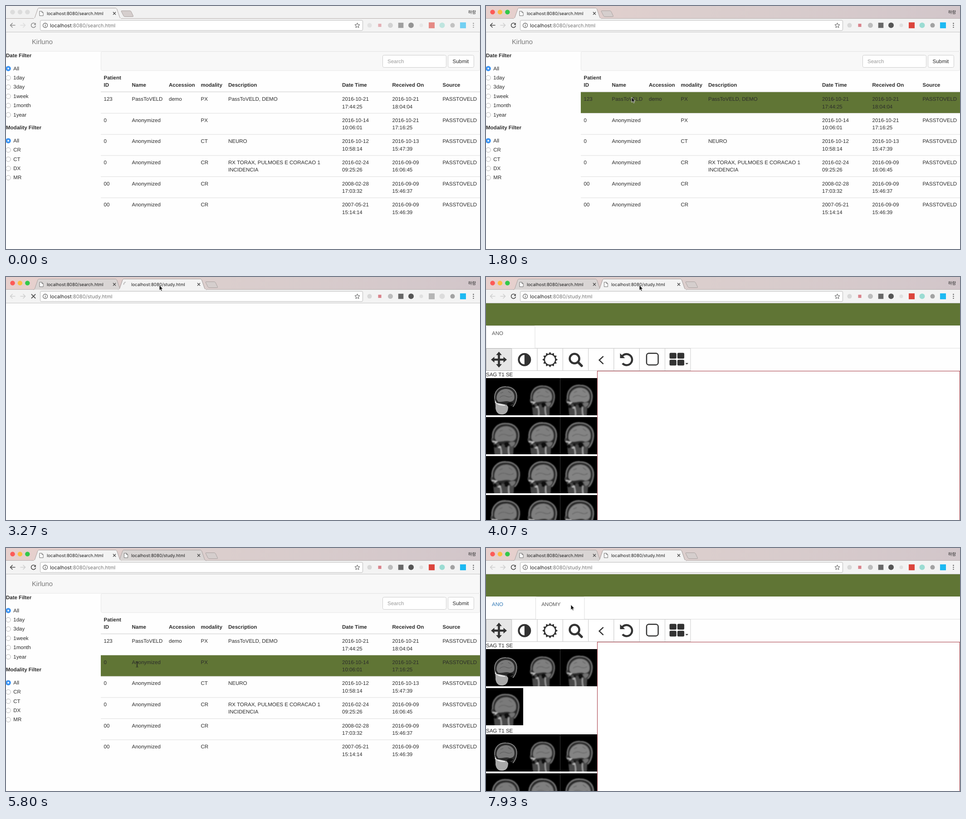
Recreate the animation shown at these times as an HTML page. Size 1045x536 px, loop 8000 ms.

```html
<!DOCTYPE html>
<html lang="en">
<head>
<meta charset="utf-8">
<title>Study browser</title>
<style>
html, body { margin: 0; width: 100%; height: 100%; overflow: hidden; background: #fff; }
svg { display: block; }
#stage { width: 100vw; height: 100vh; }
text { font: 11.5px "Liberation Sans", Arial, sans-serif; fill: #2b2b2b; white-space: pre; text-rendering: geometricPrecision; }
.b { font-weight: bold; }
.brand { font-size: 14.76px; }
.tabText { font: 9.65px Inter, sans-serif; fill: #1c1c1c; }
.url { font: 11.15px Inter, sans-serif; fill: #222; }
.url tspan { fill: #777; }
.user { font: 500 9.4px "Noto Sans CJK KR", "Noto Sans CJK", sans-serif; fill: #222; }
.line { fill: none; stroke: #4c4c4c; stroke-width: 1.6; }

.step { animation: 8s step-end infinite; }
.idle { animation-name: idle; }
.nav { animation-name: nav; }
.search { animation-name: search; }
.study { animation-name: study; }
.oneTab { animation-name: oneTab; }
.twoTabs { animation-name: twoTabs; }
.loading { animation-name: loading; }
.loaded { animation-name: loaded; }
.first { animation-name: first; }
.second { animation-name: second; }
.row0 { animation-name: row0; }
.row1 { animation-name: row1; }
.arrow { animation-name: arrow; }
.beam { animation-name: beam; }
.ring { animation-name: ring; }
.spin { animation: spin 1s linear infinite; }
.cursor { animation: move 8s ease-in-out infinite; }

@keyframes idle { 0% { opacity: 1 } 15.875%, 100% { opacity: 0 } }
@keyframes nav { 0% { opacity: .6 } 15.875%, 100% { opacity: 1 } }
@keyframes search { 0% { opacity: 1 } 29.125% { opacity: 0 } 67.5% { opacity: 1 } 78.375%, 100% { opacity: 0 } }
@keyframes study { 0% { opacity: 0 } 29.125% { opacity: 1 } 67.5% { opacity: 0 } 78.375%, 100% { opacity: 1 } }
@keyframes oneTab { 0% { opacity: 1 } 29.125%, 100% { opacity: 0 } }
@keyframes twoTabs { 0% { opacity: 0 } 29.125%, 100% { opacity: 1 } }
@keyframes loading { 0% { opacity: 0 } 29.125% { opacity: 1 } 47.5% { opacity: 0 } 78.375% { opacity: 1 } 81.75%, 100% { opacity: 0 } }
@keyframes loaded { 0% { opacity: 1 } 29.125% { opacity: 0 } 47.5% { opacity: 1 } 78.375% { opacity: 0 } 81.75%, 100% { opacity: 1 } }
@keyframes first { 0% { opacity: 0 } 47.5% { opacity: 1 } 67.5%, 100% { opacity: 0 } }
@keyframes second { 0% { opacity: 0 } 85%, 100% { opacity: 1 } }
@keyframes row0 { 0% { opacity: 0 } 15.875% { opacity: 1 } 29.125% { opacity: 0 } 70.06% { opacity: 1 } 70.78%, 100% { opacity: 0 } }
@keyframes row1 { 0% { opacity: 0 } 70.78% { opacity: 1 } 78.375%, 100% { opacity: 0 } }
@keyframes arrow { 0% { opacity: 1 } 70.78% { opacity: 0 } 78.375%, 100% { opacity: 1 } }
@keyframes beam { 0% { opacity: 0 } 70.78% { opacity: 1 } 78.375%, 100% { opacity: 0 } }
@keyframes ring {
  0% { opacity: 0 } 15.4% { opacity: 1 } 17.6% { opacity: 0 }
  26.8% { opacity: 1 } 29.1% { opacity: 0 }
  65.8% { opacity: 1 } 67.5% { opacity: 0 }
  75.8% { opacity: 1 } 77.8%, 100% { opacity: 0 }
}
@keyframes spin { to { transform: rotate(-360deg) } }
@keyframes move {
  0%, 1% { transform: translate(1000px, 552px) }
  6.5% { transform: translate(915px, 372px) }
  14%, 33% { transform: translate(321px, 201px) }
  40%, 57% { transform: translate(338px, 18px) }
  64.5%, 67.5% { transform: translate(184px, 20px) }
  71.5%, 77.5% { transform: translate(289px, 257px) }
  79%, 88% { transform: translate(291px, 256px) }
  97.5%, 100% { transform: translate(187px, 125px) }
}
</style>
</head>
<body>
<svg id="stage" viewBox="0 0 1045 536" xmlns="http://www.w3.org/2000/svg"></svg>
<script>
const GREEN = '#607535';
const text = (x, y, s, cls = '', fill = '') =>
  `<text x="${x}" y="${y}" class="${cls}"${fill && ` style="fill:${fill}"`}>${s}</text>`;
const rect = (x, y, w, h, fill, more = '') =>
  `<rect x="${x}" y="${y}" width="${w}" height="${h}" fill="${fill}" ${more}/>`;
const disc = (x, y, r, fill, more = '') =>
  `<circle cx="${x}" cy="${y}" r="${r}" fill="${fill}" ${more}/>`;
const path = (d, fill, more = '') => `<path d="${d}" fill="${fill}" ${more}/>`;
const line = (d, more = '') => `<path class="line" d="${d}" ${more}/>`;
const step = (name, body) => `<g class="step ${name}">${body}</g>`;
const at = (x, y, body) => `<g transform="translate(${x} ${y})">${body}</g>`;

// Outline of a star with n spikes around (x, y)
const starPath = (x, y, n, outer, inner) => 'M' + Array.from({ length: 2 * n }, (_, i) => {
  const a = i * Math.PI / n, r = i % 2 ? inner : outer;
  return (x + r * Math.sin(a)).toFixed(2) + ' ' + (y - r * Math.cos(a)).toFixed(2);
}).join('L') + 'Z';

/* Search page */
const cols = [215.5, 277.5, 359, 429.5, 490, 741, 851.5, 962.5];
const heads = ['ID', 'Name', 'Accession', 'modality', 'Description', 'Date Time', 'Received On', 'Source'];
const rows = [
  ['123', 'PassToVELD', 'demo', 'PX', 'PassToVELD, DEMO', '2016-10-21|17:44:25', '2016-10-21|18:04:04'],
  ['0', 'Anonymized', '', 'PX', '', '2016-10-14|10:06:01', '2016-10-21|17:16:25'],
  ['0', 'Anonymized', '', 'CT', 'NEURO', '2016-10-12|10:58:14', '2016-10-13|15:47:39'],
  ['0', 'Anonymized', '', 'CR', 'RX TORAX, PULMOES E CORACAO 1|INCIDENCIA', '2016-02-24|09:25:26', '2016-09-09|16:06:45'],
  ['00', 'Anonymized', '', 'CR', '', '2008-02-28|17:03:32', '2016-09-09|15:46:37'],
  ['00', 'Anonymized', '', 'CR', '', '2007-05-21|15:14:14', '2016-09-09|15:46:39']
];

function filter(title, y, items) {
  return text(0, y, title, 'b') + items.map((s, i) => {
    const cy = y + 25.2 + i * 20.4;
    const dot = i ? disc(5, cy, 5.2, '#fff', 'stroke="#b4b4b4"')
                  : disc(5, cy, 5.8, '#3b93f3') + disc(5, cy, 1.9, '#fff');
    return dot + text(16.3, cy + 3.5, s);
  }).join('');
}

function tableRow(cells, i) {
  const y = 190 + i * 46.6;
  const hover = i < 2 ? step('row' + i, rect(209, y, 836, 46.4, GREEN)) : '';
  const border = i ? rect(209, y - .5, 836, 1, '#ddd') : '';
  return border + hover + [...cells, 'PASSTOVELD'].map((cell, c) =>
    cell.split('|').map((s, k) => s && text(cols[c], y + 19.2 + k * 16.4, s)).join('')).join('');
}

const searchPage =
  rect(.5, 57.5, 1044, 42.5, '#f8f8f8', 'stroke="#e7e7e7" rx="3"') +
  text(57, 84, 'Kirluno', 'brand', '#777') +
  filter('Date Filter', 112.8, ['All', '1day', '3day', '1week', '1month', '1year']) +
  filter('Modality Filter', 272, ['All', 'CR', 'CT', 'DX', 'MR']) +
  rect(209.5, 100.5, 835, 42, '#f8f8f8', 'stroke="#e7e7e7" rx="3"') +
  rect(830.5, 108.5, 140, 27, '#fff', 'stroke="#ccc" rx="3"') + text(841, 126, 'Search', '', '#999') +
  rect(974.5, 108.5, 57, 27, '#fff', 'stroke="#ccc" rx="3"') + text(984.5, 126, 'Submit') +
  text(215.5, 161.8, 'Patient', 'b') + heads.map((s, i) => text(cols[i], 178.2, s, 'b')).join('') +
  rect(209, 188.6, 836, 1.6, '#ddd') + rows.map(tableRow).join('');

/* Study page */
function thumb(i, x, y) {
  const k = Math.min(1.06, .85 + i * .055);
  const gray = v => `rgb(${v},${v},${v})`;
  const neck = i
    ? path('M15 42Q10 49 13 53L17 58Q18 68 20 90H61Q58 70 64 58L62 40Z', gray(74)) +
      path('M30 62Q36 72 33 90M50 64Q48 76 53 90', 'none', 'stroke="#a0a0a0" stroke-width="3"')
    : path('M14 46Q18 60 17 70Q20 88 36 86Q50 84 50 66L40 54Z', '#a8a8a8') +
      path('M17 52Q26 62 42 60', 'none', 'stroke="#e2e2e2" stroke-width="6"');
  const skull =
    path('M15 46C13 26 26 13 44 14C62 14 73 26 72 42C71 54 66 62 60 64L20 56Z', '#2c2c2c') +
    path('M15 46C13 26 26 13 44 14C62 14 73 26 72 42C71 54 66 62 62 66', 'none', 'stroke="#808080" stroke-width="2.4"');
  const brain =
    path('M20 47C18 31 30 20 44 20C58 20 67 30 66 42C66 50 60 53 54 53C44 49 34 55 24 53Z', gray(122 + 5 * (i % 3))) +
    path('M28 42Q36 35 45 39T60 38M30 31L37 28M50 26L57 31', 'none', 'stroke="#5c5c5c" stroke-width="1.3"');
  const base = i
    ? path('M50 56Q58 52 64 55Q63 64 55 64Z', '#727272') +
      path('M40 58Q46 50 51 60L47 66H42Z', '#0c0c0c') +
      disc(21, 63, 4, '#0c0c0c') + disc(32, 60, 3, '#141414') +
      path('M14 53L24 54L20 57M27 66L33 66', 'none', 'stroke="#c4c4c4" stroke-width="2.4"')
    : path('M46 58Q56 52 64 57L52 65Z', '#0c0c0c');
  return `<svg x="${x}" y="${y}" width="82" height="82" viewBox="0 0 82 82">` + rect(0, 0, 82, 82, '#000') +
    `<g filter="url(#soft)" transform="translate(43 44.5) scale(${k}) translate(-43 -44)">${neck}${skull}${brain}${base}</g></svg>`;
}
const series = (y, n) => text(0, y - 4, 'SAG T1 SE') + Array.from({ length: n }, (_, i) =>
  thumb(i, i % 3 * 81.6, y + Math.floor(i / 3) * 86)).join('');

const arm = path('M-2.3 0V-10H-6.4L0 -17.5L6.4 -10H2.3V0Z', '#333');
const tools = [
  [0, 90, 180, 270].map(a => `<g transform="rotate(${a})">${arm}</g>`).join(''),
  disc(0, 0, 12.5, 'none', 'stroke="#333" stroke-width="4"') + path('M0 -12V12A12 12 0 0 0 0 -12Z', '#333'),
  path(starPath(0, 0, 12, 17, 13), '#333') + disc(0, 0, 11, '#fff'),
  disc(-2.3, -2.3, 10.5, 'none', 'stroke="#333" stroke-width="4.6"') +
    path('M5.5 5.5L13.5 13.5', 'none', 'stroke="#333" stroke-width="5.4" stroke-linecap="round"'),
  path('M5 -7.5L-4 1L5 9.5', 'none', 'stroke="#333" stroke-width="2.5"'),
  path('M-10.5 -6.5A12.2 12.2 0 1 1 -9 8.3', 'none', 'stroke="#333" stroke-width="4.4"') +
    path('M-14.5 -14V-3.2H-3.6Z', '#333'),
  rect(-12.3, -14, 25.6, 25.6, 'none', 'rx="5" stroke="#333" stroke-width="2.5"'),
  [0, 1, 2, 3].map(i => rect(-18 + i % 2 * 17.3, -15 + (i >> 1) * 15.2, 15.2, 12.8, '#333', 'rx="2.5"')).join('') +
    path('M17 7.5H23.4L20.2 10.8Z', '#333')
];

function studyPage(active, list) {
  const left = active ? 109.5 : .5;
  return rect(0, 57.5, 1045, 49.5, GREEN) +
    rect(0, 156.6, 1045, 1, '#ddd') +
    path(`M${left} 158V110Q${left} 107.5 ${left + 3} 107.5H${left + 104.5}Q${left + 107.5} 107.5 ${left + 107.5} 110V158`, '#fff', 'stroke="#ddd"') +
    text(13, 128.3, 'ANO', '', active ? '#337ab7' : '#555') +
    (active ? text(122.2, 128.3, 'ANOMY', '', '#555') : '') +
    tools.map((icon, i) =>
      rect(i * 56.3 + .5, 157.5, 56.3, 49, i ? '#fff' : '#e6e6e6', `stroke="${i ? '#ccc' : '#adadad'}"`) +
      at(28.5 + i * 56.3, 182.3, icon)).join('') +
    list + rect(245.5, 207.5, 799, 340, '#fff', 'stroke="#a5353f"');
}

/* Browser frame */
const TAB = '#d9d5d4';
const tabShape = (x, fill) => at(x, 0,
  path('M0 28C3 27.5 3.4 26 4 24L9.5 8C10.3 5.4 11 4.5 13 4.5H181C183 4.5 184 5.4 185 8L190.5 24C191.2 26 192 27.5 195 28', fill, 'stroke="#a8a09f"'));
const plus = x => at(x, 10.5,
  path('M0 1Q-.5 0 2 0H19Q21 0 22 2L26.5 11.5Q27 13 25 13H8Q6 13 5 11Z', '#d5cecd', 'stroke="#aaa2a1"'));
const page = x => at(x, 11.5, path('M0 0H5L8 3V10H0ZM5 0V3H8', '#fff', 'stroke="#666" stroke-width=".9"'));
const cross = (x, y, r, w) => line(`M${x - r} ${y - r}L${x + r} ${y + r}M${x + r} ${y - r}L${x - r} ${y + r}`, `style="stroke-width:${w}"`);
const url = s => text(97, 46.6, `localhost<tspan>:8080/${s}</tspan>`, 'url');
const arrowBack = 'M20.5 42.5H9.5M14.5 37.5L9.5 42.5L14.5 47.5';
const pale = 'style="stroke:#cfcfcf"';
const lights = colors => colors.map((c, i) => disc(14.5 + i * 16.4, 13.4, 5.2, c)).join('');
const box = (x, s, fill) => rect(x - s / 2, 42.6 - s / 2, s, s, fill);

const badges =
  disc(801.5, 42.6, 5, '#d8d8d8') + box(824, 7, '#d9828a') + disc(847.5, 42.6, 5.5, '#bdbdbd') +
  box(870.5, 11.5, '#686868') + disc(893, 42.6, 6, '#555') + disc(915.5, 42.6, 4, '#e0e0e0') +
  disc(984.5, 42.6, 5, '#a2a2a2') + box(1007.5, 13, '#1db9f2') +
  step('loaded', box(938.5, 13, '#dc453d') + disc(961.5, 42.6, 6, '#9bdcd3')) +
  step('loading', box(938.5, 13, '#b5b5b5') + disc(961.5, 42.6, 6, '#dcdcdc'));

const frame =
  rect(0, 0, 1045, 28, 'url(#strip)') + lights(['#fc5b57', '#fdbe41', '#34c84a']) +
  step('idle', rect(0, 0, 1045, 28, '#f1f1f1') + lights(['#dcdcdc', '#dcdcdc', '#dcdcdc'])) +
  rect(0, 27.5, 1045, 30, '#f3f3f3') + rect(0, 27, 1045, 1, '#b5adac') +
  step('oneTab', plus(254)) +
  step('twoTabs', plus(440) + tabShape(247, TAB)) +
  step('study', tabShape(60, TAB) + tabShape(247, '#f3f3f3') + rect(248, 27, 193, 2, '#f3f3f3')) +
  step('search', tabShape(60, '#f3f3f3') + rect(61, 27, 193, 2, '#f3f3f3')) +
  page(74) + text(90, 19.6, 'localhost:8080/search.html', 'tabText') + cross(239, 16.3, 3, 1.4) +
  step('twoTabs', text(276, 19.6, 'localhost:8080/study.html', 'tabText') + cross(425, 16.3, 3, 1.4) +
    step('loaded', page(260.5)) +
    step('loading', at(264.5, 16.3, `<g class="spin">${path('M0 -5A5 5 0 0 1 5 0', 'none', 'stroke="#aaa" stroke-width="1.4"')}</g>`))) +
  text(1018.8, 17, '하람', 'user') +
  rect(0, 57, 1045, 1, '#c4c4c4') +
  rect(75.5, 31.5, 711, 22.5, '#fff', 'stroke="#b9b9b9" rx="2.5"') +
  step('nav',
    step('search', line(arrowBack)) + step('study', line(arrowBack, pale)) +
    line('M31.5 42.5H42.5M37.5 37.5L42.5 42.5L37.5 47.5', pale) +
    step('loaded', line('M64.3 39.2A5 5 0 1 0 65.4 43.5') + path('M65.8 37V41.8H61Z', '#4c4c4c')) +
    step('loading', cross(60.5, 42.5, 4.6, 1.7)) +
    badges + [38.3, 42.6, 46.9].map(y => disc(1030.5, y, 1.2, '#555')).join('')) +
  disc(86.5, 42.6, 5, 'none', 'stroke="#555" stroke-width="1.1"') +
  rect(85.9, 41.8, 1.3, 3.6, '#555') + rect(85.9, 39.6, 1.3, 1.3, '#555') +
  path(starPath(774.5, 43, 5, 5.8, 2.6), 'none', 'stroke="#555"') +
  step('search', url('search.html')) + step('study', url('study.html'));

const cursor = `<g class="cursor">` +
  step('arrow', path('M0 0V11.5L2.6 9.2L4.4 13L6.3 12.2L4.6 8.4H8Z', '#111', 'stroke="#fff" stroke-width=".8"')) +
  step('beam', path('M-2.5 -5.5Q0 -5.5 0 -4Q0 -5.5 2.5 -5.5M0 -4V4M-2.5 5.5Q0 5.5 0 4Q0 5.5 2.5 5.5M-1.5 1.5H1.5', 'none', 'stroke="#222" stroke-width="1.1"')) +
  step('ring', disc(0, 0, 16, '#fff', 'fill-opacity=".25" stroke="#111" stroke-width="2.3"')) + `</g>`;

document.getElementById('stage').innerHTML = `<defs>
  <linearGradient id="strip"><stop stop-color="#e7d0cd"/><stop offset=".45" stop-color="#dbcecd"/><stop offset="1" stop-color="#d2c6ca"/></linearGradient>
  <filter id="soft"><feGaussianBlur stdDeviation=".9"/></filter></defs>` +
  rect(0, 0, 1045, 536, '#fefefe') +
  step('search', searchPage) +
  step('first', studyPage(0, series(223, 12))) +
  step('second', studyPage(1, series(223, 4) + series(411, 6))) +
  frame + cursor;
</script>
</body>
</html>
```
